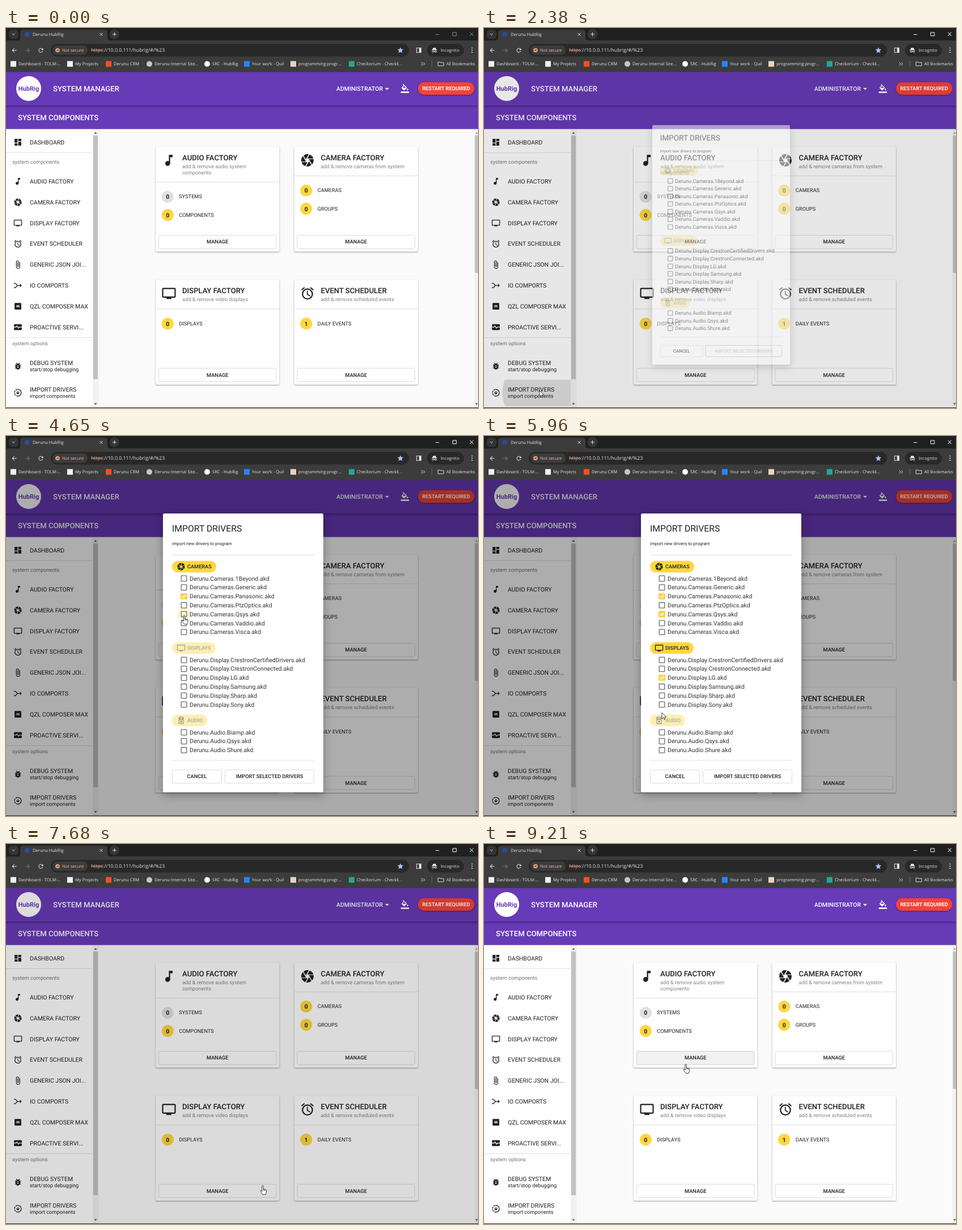
An HTML page for the animation above (9.46 s loop, 833x672 px).

```html
<!DOCTYPE html>
<html lang="en">
<head>
<meta charset="utf-8">
<title>Import drivers</title>
<style>
  html, body { margin: 0; width: 100%; height: 100%; overflow: hidden; background: #fafafa; }
  svg { display: block; width: 100vw; height: 100vh; }
  text { font-family: Roboto, sans-serif; text-rendering: geometricPrecision; white-space: pre; }
  .ui text { font-family: "Open Sans", sans-serif; }
  .m { font-weight: 500; }
  .b { font-weight: 700; }
  .c { text-anchor: middle; }
  .line { fill: none; stroke-linecap: round; stroke-linejoin: round; }
  .card { filter: drop-shadow(0 1.2px 1.3px rgba(0,0,0,.38)); }
  .bar { filter: drop-shadow(0 1.5px 2.5px rgba(0,0,0,.45)); }
  .sheet { filter: drop-shadow(0 5px 8px rgba(0,0,0,.3)); }
</style>
</head>
<body>
<svg id="stage" viewBox="0 0 833 672" preserveAspectRatio="none"></svg>
<script>
const LOOP = 9460, INK = '#212121', AMBER = '#ffd740', PURPLE = '#673ab7';
const BRAND = 'Derunu', APP = 'HubRig';

// Icons on a 24 unit grid: plain path data, or markup
const icons = {
  dashboard: 'M3 13h8V3H3zm0 8h8v-6H3zm10 0h8V11h-8zm0-18v6h8V3z',
  note: 'M12 3v10.55A4 4 0 1 0 14 17V7h4V3z',
  camera: 'M9.4 10.5l4.77-8.26A10 10 0 0 0 5.68 4.25l3.66 6.35zM21.54 9a10 10 0 0 0-6-6.34L11.88 9zm.26 1h-7.49l.29.5 4.76 8.25A10 10 0 0 0 21.8 10zM8.54 12l-3.9-6.75A10 10 0 0 0 2.2 14h7.49zm-6.08 3a10 10 0 0 0 6 6.34L12.12 15zm11.27 0l-3.9 6.76a10 10 0 0 0 8.49-2.01l-3.66-6.35z',
  tv: 'M21 3H3a2 2 0 0 0-2 2v12a2 2 0 0 0 2 2h5v2h8v-2h5a2 2 0 0 0 2-2V5a2 2 0 0 0-2-2zm0 14H3V5h18z',
  alarm: '<g class="line" stroke="currentColor" stroke-width="2"><circle cx="12" cy="13" r="8"/><path stroke-width="1.6" d="M11.8 8.5v5l4 2.5"/><path stroke-linecap="butt" d="M2.6 6.5l4.6-3.9M21.4 6.5l-4.6-3.9"/></g>',
  clip: '<path class="line" stroke="currentColor" stroke-width="1.6" d="M17.2 6v11.5a4.7 4.7 0 0 1-9.4 0V5a3.2 3.2 0 0 1 6.4 0v10.5a1.7 1.7 0 0 1-3.4 0V6"/>',
  ports: '<path class="line" stroke="currentColor" stroke-width="2" d="M2 6h2c4 0 4 6 8 6h9m-3-3 3 3-3 3M2 18h2c4 0 4-6 8-6"/>',
  uhd: '<rect x="3" y="3" width="18" height="18" rx="2"/><text class="b c" x="12" y="15.2" font-size="9" fill="#fff">4K</text>',
  pulse: '<rect x="1.5" y="4" width="21" height="16" rx="2"/><path class="line" stroke="#fff" stroke-width="2" d="M2 12h5l2.5-3 4 6 2.5-3h6"/>',
  bug: '<ellipse cx="12" cy="13" rx="6" ry="8"/><path class="line" stroke="currentColor" stroke-width="2" d="M5 9h14M5 13h14M5 17h14M8 4l3 3M16 4l-3 3"/><path stroke="#fff" stroke-width="2" d="M10 11h4m-4 4h4"/>',
  download: '<g class="line" stroke="currentColor" stroke-width="2"><path d="M12 3a9 9 0 0 1 0 18"/><path stroke-dasharray="4 3.2" d="M12 21a9 9 0 0 1 0-18"/><path d="M12 8v7m-3.5-3 3.5 3.5 3.5-3.5"/></g>',
  speaker: '<path fill-rule="evenodd" d="M7 2h10a2 2 0 0 1 2 2v16a2 2 0 0 1-2 2H7a2 2 0 0 1-2-2V4a2 2 0 0 1 2-2zm5 2a2 2 0 1 0 0 4 2 2 0 0 0 0-4zm0 6a5 5 0 1 0 0 10 5 5 0 0 0 0-10z"/><circle cx="12" cy="15" r="3"/>',
  paint: 'M16.56 8.94L7.62 0 6.21 1.41l2.38 2.38-5.15 5.15a1.5 1.5 0 0 0 0 2.12l5.5 5.5a1.5 1.5 0 0 0 2.12 0l5.5-5.5a1.5 1.5 0 0 0 0-2.12zM5.21 10L10 5.21 14.79 10zM19 11.5s-2 2.17-2 3.5a2 2 0 0 0 4 0c0-1.33-2-3.5-2-3.5zM1 20h22v4H1z',
  back: 'M20 11H7.83l5.59-5.59L12 4l-8 8 8 8 1.41-1.41L7.83 13H20z',
  forward: 'M4 11h12.17l-5.59-5.59L12 4l8 8-8 8-1.41-1.41L16.17 13H4z',
  reload: 'M17.65 6.35A8 8 0 1 0 19.73 14h-2.08A6 6 0 1 1 16.22 7.78L13 11h7V4z',
  star: 'M12 17.27 18.18 21l-1.64-7.03L22 9.24l-7.19-.61L12 2 9.19 8.63 2 9.24l5.46 4.73L5.82 21z',
  folder: '<path class="line" stroke="currentColor" stroke-width="2" d="M2 5h7l2 2h11v12H2z"/>',
  panel: '<path fill-rule="evenodd" d="M3 3h18v18H3zm2 2v14h8V5z"/>',
  spy: '<path d="M7 3h10l2 7H5zM2 10h20v2H2z"/><g class="line" stroke="currentColor" stroke-width="2"><circle cx="7" cy="17" r="3"/><circle cx="17" cy="17" r="3"/><path d="M10 16h4"/></g>'
};

// Texts and icons are placed by their vertical centre
const text = (x, y, size, str, cls = '', fill = INK) =>
  `<text x="${x}" y="${y + size * .355}" font-size="${size}" class="${cls}" fill="${fill}">${str}</text>`;
const rect = (x, y, w, h, fill, r = 0, more = '') =>
  `<rect x="${x}" y="${y}" width="${w}" height="${h}" rx="${r}" fill="${fill}" ${more}/>`;
const disc = (x, y, r, fill, more = '') => `<circle cx="${x}" cy="${y}" r="${r}" fill="${fill}" ${more}/>`;
const line = (d, color, width = 1, more = '') =>
  `<path class="line" d="${d}" stroke="${color}" stroke-width="${width}" ${more}/>`;
const icon = (name, x, y, size = 15.8, color = INK) => {
  const art = icons[name], k = size / 24;
  return `<g transform="translate(${x - size / 2} ${y - size / 2}) scale(${k})" fill="${color}" color="${color}">` +
    (art[0] === '<' ? art : `<path d="${art}"/>`) + '</g>';
};
const outline = (x, y, w, label) =>
  rect(x + .5, y + .5, w - 1, 23.5, 'none', 2, 'stroke="#dcdcdc"') + text(x + w / 2, y + 12, 9.2, label, 'm c');

function browser() {
  const UI = 7.6, PALE = '#e3e3e3', BAR = '#3c3c3c', WELL = '#282828';
  const bookmarks = [
    [13, '#f1f1f1', 'Dashboard - TOLM-...'], [113, '#f1f1f1', 'My Projects'],
    [181, '#f25022', BRAND + ' CRM'], [253, '#c4c7c5', BRAND + ' Internal Site...', 1],
    [355, '#fff', 'SRC - ' + APP, 1], [425, '#2684ff', 'Your work - Quil'],
    [507, '#e8d5c0', 'programming:progr...'], [610, '#26a69a', 'Checkorium - Checkli...']
  ];
  return '<g class="ui">' + rect(0, 0, 833, 78, BAR) + rect(0, 0, 833, 22, '#1f2020') +
    rect(5, 3, 16.5, 16.5, '#343535', 5) + line('M11 10l2.2 2.2 2.2-2.2', PALE) +
    `<path fill="${BAR}" d="M20 22q5 0 5-5V9q0-6 6-6h142q6 0 6 6v8q0 5 5 5z"/>` +
    disc(37, 11, 4.6, '#2c4a9a') + text(47, 11.5, UI, BRAND + ' ' + APP, '', PALE) +
    line('M165.8 9.2l4.4 4.4m0-4.4l-4.4 4.4', PALE) +
    disc(191.5, 11, 9, '#343535') + line('M188.5 11h6m-3-3v6', PALE) +
    `<g id="controls">${line('M758.5 11.5h5.5M788.8 7.8h6v6h-6zM818.8 7.8l6 6m0-6l-6 6', 'currentColor')}</g>` +
    icon('back', 14.5, 39.5, 12, PALE) + icon('forward', 38, 39.5, 12, '#777') + icon('reload', 61.5, 39.5, 12, PALE) +
    rect(79, 28, 632, 22.5, WELL, 11) + rect(82, 31, 62, 16.5, BAR, 8) +
    disc(91, 39.3, 3.8, '#e9a27f') + line('M89.7 38l2.6 2.6m0-2.6l-2.6 2.6', BAR) +
    text(99, 39.3, UI, 'Not secure', '', '#f3b7a0') +
    text(150, 39.3, 8.7, `<tspan fill="#e9a08c" text-decoration="line-through">https</tspan>://10.0.0.111/${APP.toLowerCase()}/#/%23`, '', PALE) +
    icon('star', 696, 39.3, 13, '#a8c7fa') + icon('panel', 728.5, 39.3, 12, PALE) +
    rect(743, 28, 65, 22.5, WELL, 11) + icon('spy', 756, 39.3, 11.5, PALE) + text(767, 39.3, UI, 'Incognito', '', PALE) +
    [35.5, 39.3, 43].map(y => disc(822.5, y, 1, PALE)).join('') +
    bookmarks.map(([x, color, label, round]) =>
      (round ? disc(x, 63.5, 5, color) : rect(x - 5, 58.5, 10, 10, color)) + text(x + 9, 63.5, UI, label, '', PALE)).join('') +
    line('M733 61l2.5 2.5-2.5 2.5m3.5-5l2.5 2.5-2.5 2.5', PALE) + line('M751.5 58v11', '#666') +
    icon('folder', 767.5, 63.5, 11.5, PALE) + text(777, 63.5, UI, 'All Bookmarks', '', PALE) + '</g>';
}

const header = () =>
  rect(0, 137, 833, 41.7, PURPLE) + text(21, 158, 13.14, 'SYSTEM COMPONENTS', 'm', '#fff') +
  rect(-9, 78, 851, 59, PURPLE, 0, 'class="bar"') + rect(0, 70, 833, 8, '#3c3c3c') +
  disc(40, 107, 22, '#fff') + text(40, 107, 11, APP, 'b c', PURPLE) +
  text(83, 107, 13.14, 'SYSTEM MANAGER', 'm', '#fff') +
  text(583, 107, 10.5, 'ADMINISTRATOR', 'm', '#fff') + '<path d="M669 106h7l-3.5 3.5z" fill="#fff"/>' +
  icon('paint', 704, 107, 15.8, '#fff') +
  rect(727, 96, 99.5, 22, '#f44336', 11, 'class="card"') + text(776.7, 107, 9.2, 'RESTART REQUIRED', 'b c', '#fff');

function sidebar() {
  const items = [
    ['dashboard', 'DASHBOARD', 202], ['note', 'AUDIO FACTORY'], ['camera', 'CAMERA FACTORY'],
    ['tv', 'DISPLAY FACTORY'], ['alarm', 'EVENT SCHEDULER'], ['clip', 'GENERIC JSON JOI...'],
    ['ports', 'IO COMPORTS'], ['uhd', 'QZL COMPOSER MAX'], ['pulse', 'PROACTIVE SERVI...'],
    ['bug', 'DEBUG SYSTEM', 598, 'start/stop debugging'], ['download', 'IMPORT DRIVERS', 645, 'import components']
  ];
  return rect(0, 178, 153, 494, '#fefefe') +
    '<clipPath id="row"><rect y="622" width="153" height="47"/></clipPath>' +
    `<g clip-path="url(#row)">${disc(98, 645, 0, '#000', 'id="ripple"')}</g>` +
    rect(0, 220, 153, 1, '#e0e0e0') + rect(0, 547, 153, 1, '#e0e0e0') +
    text(11, 236.5, 9.2, 'system components', '', '#757575') + text(11, 557.5, 9.2, 'system options', '', '#757575') +
    items.map(([art, label, at, note], i) => {
      const y = at || 271.3 + (i - 1) * 36.8;
      return icon(art, 21, y) + text(42, note ? y - 6 : y, 10.5, label) + (note ? text(42, y + 6, 9.2, note) : '');
    }).join('') +
    rect(153, 179, 11, 493, '#f1f1f1') + rect(154, 190, 8, 431, '#c1c1c1') +
    '<path d="M155.5 187h5l-2.5-3zM155.5 663.5h5l-2.5 3z" fill="#505050"/>' +
    rect(827, 179, 6, 493, '#f1f1f1') + rect(827.5, 190, 6, 243, '#c1c1c1') +
    '<path d="M828 187h5l-2.5-3z" fill="#a0a0a0"/><path d="M828 663.5h5l-2.5 3z" fill="#505050"/>';
}

const manageButtons = [];
function card(x, y, art, title, notes, counters) {
  const rule = y + 40 + notes.length * 11;
  manageButtons.push([x + 5, y + 156]);
  return rect(x, y, 218.5, 185.5, '#fefefe', 2.6, 'class="card"') + icon(art, x + 23.5, y + 24, 26.3) +
    text(x + 47, y + 19.3, 13.14, title, 'm') +
    notes.map((note, i) => text(x + 47, y + 34.5 + i * 11.3, 9.2, note, '', '#858585')).join('') +
    rect(x, rule, 218.5, 1, '#e0e0e0') +
    counters.map(([n, label, color = AMBER], i) => {
      const cy = rule + 26.5 + i * 32.2;
      return disc(x + 21.3, cy, 10.6, color) + text(x + 21.3, cy + .2, 10.5, n, 'b c') + text(x + 41.3, cy - .3, 9.2, label);
    }).join('') + outline(x + 5, y + 156, 208.5, 'MANAGE');
}

const groups = [
  { label: 'CAMERAS', folder: 'Cameras', art: 'camera', y: 231, w: 78,
    drivers: ['1Beyond', 'Generic', 'Panasonic', 'PtzOptics', 'Qsys', 'Vaddio', 'Visca'], clicks: { 2: 3800, 4: 4850 } },
  { label: 'DISPLAYS', folder: 'Display', art: 'tv', y: 375, w: 77,
    drivers: ['CrestronCertifiedDrivers', 'CrestronConnected', 'LG', 'Samsung', 'Sharp', 'Sony'], clicks: { 2: 5460 } },
  { label: 'AUDIO', folder: 'Audio', art: 'speaker', y: 503, w: 62,
    drivers: ['Biamp', 'Qsys', 'Shure'], clicks: { 1: 6370 } }
];
// Everything a click switches on: [element id, time]
const switches = [['ready', 3800]], rowCentres = [];

const group = (g, k) => {
  switches.push(['chip' + k, Math.min(...Object.values(g.clicks))]);
  return `<g id="chip${k}">` + rect(293, g.y - 10.3, g.w, 20.6, AMBER, 10.3) +
    icon(g.art, 309, g.y) + text(320, g.y, 9.2, g.label, 'm') + '</g>' +
    g.drivers.map((driver, i) => {
      const y = g.y + 21 + i * 15.77, id = `check${k}${i}`;
      rowCentres.push(y);
      if (g.clicks[i]) switches.push([id, g.clicks[i]]);
      return rect(309.2, y - 4.8, 9.6, 9.6, 'none', .6, 'stroke="#6b6b6b" stroke-width="1.3"') +
        (g.clicks[i] ? `<g id="${id}">` + rect(308.5, y - 5.5, 11, 11, AMBER, 1) +
          line(`M310.8 ${y}l2.3 2.3 4.3-4.5`, '#fff', 1.4) + '</g>' : '') +
        text(324, y, 10.5, `${BRAND}.${g.folder}.${driver}.akd`, '', '#333');
    }).join('');
};

const dialog = () => '<g id="dialog">' + rect(277, 137, 283, 493, '#fff', 2.6, 'class="sheet"') +
  text(293, 163, 15.77, 'IMPORT DRIVERS') + text(293, 190, 7.88, 'import new drivers to program') +
  rect(293, 210, 251, 1, '#e0e0e0') + disc(314, 0, 11.8, AMBER, 'id="halo" fill-opacity=".2"') +
  groups.map(group).join('') + rect(293, 573, 251, 1, '#e0e0e0') + outline(293, 590, 88, 'CANCEL') +
  `<g id="waiting">${rect(386.5, 590.5, 157, 23.5, 'none', 2, 'stroke="#b8b8b8"')}${text(465, 602, 9.2, 'IMPORT SELECTED DRIVERS', 'm c', '#bdbdbd')}</g>` +
  `<g id="ready">${outline(386, 590, 158, 'IMPORT SELECTED DRIVERS')}</g></g>`;

const stage = document.getElementById('stage');
stage.innerHTML = rect(0, 78, 833, 594, '#fafafa') + sidebar() + header() + browser() +
  card(264, 210, 'note', 'AUDIO FACTORY', ['add &amp; remove audio system', 'components'],
    [[0, 'SYSTEMS', '#e0e0e0'], [0, 'COMPONENTS']]) +
  card(508.5, 210, 'camera', 'CAMERA FACTORY', ['add &amp; remove cameras from system'], [[0, 'CAMERAS'], [0, 'GROUPS']]) +
  card(264, 445.3, 'tv', 'DISPLAY FACTORY', ['add &amp; remove video displays'], [[0, 'DISPLAYS']]) +
  card(508.5, 445.3, 'alarm', 'EVENT SCHEDULER', ['add &amp; remove scheduled events'], [[1, 'DAILY EVENTS']]) +
  rect(0, 0, 208.5, 24.5, '#000', 2, 'id="tint" fill-opacity=".05"') +
  rect(0, 78, 833, 593, '#000', 0, 'id="scrim"') + dialog() + rect(0, 671, 833, 1, '#2a2a2a') +
  '<g id="pointer" fill="#fff" stroke="#111" stroke-width=".8" stroke-linejoin="round">' +
  '<path id="arrow" d="M0 0v11l2.6-2.4 1.7 4 1.7-.7-1.7-3.9h3.5z"/>' +
  '<path id="hand" d="M-1.2 1q0-1.5 1.2-1.5t1.2 1.5v5l4.2.8q1.6.4 1.4 2l-.8 4-.8 2.6h-5l-3.8-5.2q-1-1.6.2-2 1-.2 2 1.2l.4.6zM1.4 6v2.4M3.4 6.6v2M5 7v1.8"/></g>';

const el = id => document.getElementById(id);
const set = (id, attrs) => { for (const name in attrs) el(id).setAttribute(name, attrs[name]); };
const show = (id, on) => set(id, { visibility: on ? 'inherit' : 'hidden' });
const span = (t, start, length) => Math.min(1, Math.max(0, (t - start) / length));

// Pointer stops: time, x, y
const path = [
  [790, 625, 471], [1120, 450, 540], [1420, 150, 602], [1680, 70, 626], [2080, 98, 641], [2680, 98, 641],
  [3160, 240, 420], [3600, 314, 285], [4480, 314, 285], [4590, 314.5, 317.5], [4980, 314.5, 317.5], [5380, 314, 428],
  [5680, 314, 428], [5950, 314, 489], [6160, 314, 540], [6600, 314, 540], [7240, 453, 604.5], [7760, 453, 604.5],
  [8240, 480, 563], [8500, 517, 651], [8700, 517, 651], [9150, 356, 390]
];
function pointerAt(t) {
  const i = path.findIndex(stop => stop[0] > t);
  if (i < 0) return path[path.length - 1].slice(1);
  if (!i) return path[0].slice(1);
  const [t0, x0, y0] = path[i - 1], [t1, x1, y1] = path[i], u = span(t, t0, t1 - t0), e = u * u * (3 - 2 * u);
  return [x0 + (x1 - x0) * e, y0 + (y1 - y0) * e];
}

function render(t) {
  const [x, y] = pointerAt(t), closing = span(t, 7520, 120);
  const opened = 1 - (1 - span(t, 2293, 225)) ** 4, zoom = (.5 + opened / 2) * (1 - closing / 2);
  const modal = t > 2293 && t < 7640;
  show('dialog', modal);
  set('dialog', {
    opacity: opened ** 2 * (1 - closing),
    transform: `translate(418.5 383.5) scale(${zoom}) translate(-418.5 -383.5)`
  });
  set('scrim', { 'fill-opacity': .32 * span(t, 2308, 165) * (1 - span(t, 7540, 205)) });
  set('ripple', { r: t > 2220 ? 40 + .19 * (t - 2220) : 0, opacity: .12 * span(t, 2200, 80) * (1 - span(t, 2400, 240)) });
  set('controls', { color: t < 2220 ? '#8a8a8a' : '#fff' });
  for (const [id, at] of switches) {
    if (id.startsWith('chip')) set(id, { opacity: t < at ? .4 : 1 });
    else show(id, t >= at);
  }
  show('waiting', t < 3800);

  const row = modal && Math.abs(x - 314) < 9 ? rowCentres.find(c => Math.abs(y - c) < 6.5) : undefined;
  const over = (bx, by, w) => x > bx && x < bx + w && y > by && y < by + 25;
  const button = !modal && manageButtons.find(b => over(...b, 208.5));
  show('halo', row);
  if (row) set('halo', { cy: row });
  show('tint', button && t > 7760);
  if (button) set('tint', { x: button[0], y: button[1] });

  const hand = row || button || modal && over(386, 590, 158);
  show('pointer', t >= 790);
  set('pointer', { transform: `translate(${x} ${y})` });
  show('hand', hand);
  show('arrow', !hand);
}

const STEP = 68, START = 790;
function tick() {
  const t = performance.now() % LOOP;
  render(t < START ? 0 : START + Math.floor((t - START) / STEP) * STEP);
  requestAnimationFrame(tick);
}
tick();
</script>
</body>
</html>
```
